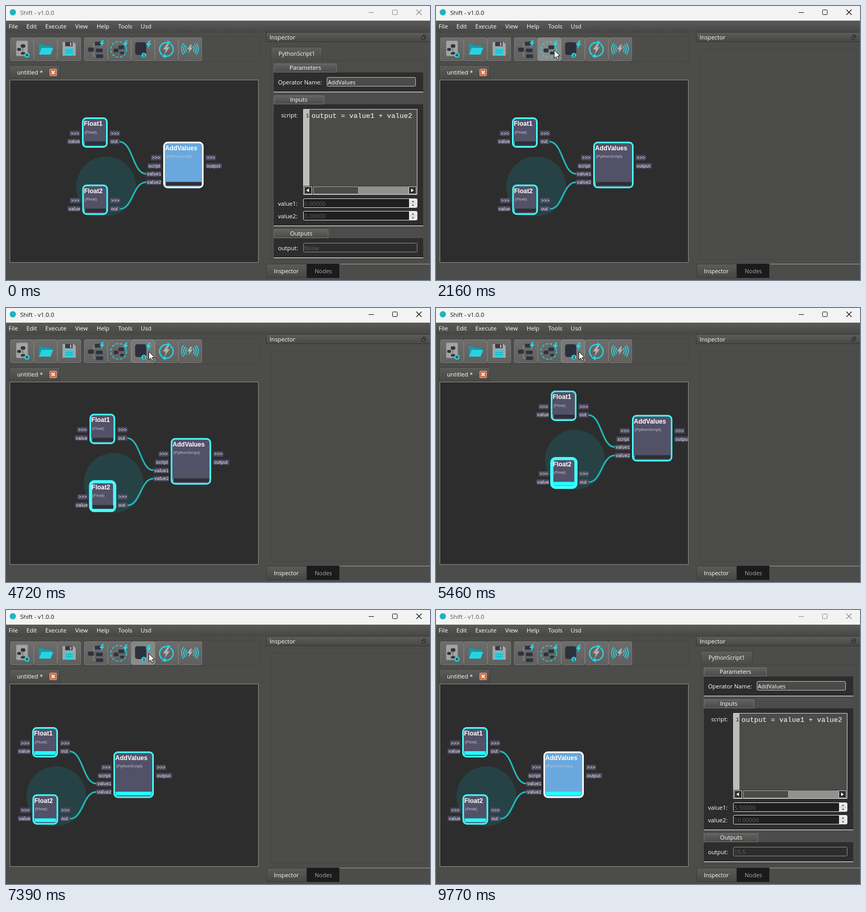
An HTML page with a canvas that plays this animation: 809 px wide and 524 px high, repeating every 9.82 s.

```html
<!DOCTYPE html>
<html lang="en">
<head>
<meta charset="utf-8">
<title>Shift - v1.0.0</title>
<style>
html, body { margin: 0; width: 100%; height: 100%; overflow: hidden; background: #4c4c4a; }
canvas { display: block; }
</style>
</head>
<body>
<canvas width="809" height="524"></canvas>
<script>
const g = document.querySelector('canvas').getContext('2d');
const LOOP = 9820, CYAN = '#4ff', ICON = '#27d3e3', DARK = '#2d2d2d';
const UI = '"Open Sans", "Noto Sans", sans-serif';
const SANS = '"Liberation Sans", Arial, sans-serif';
const MONO = '"Liberation Mono", monospace';

// time, x, y
const cursorPath = [
  [340, 395, 475], [600, 371, 183], [1060, 371, 183], [1200, 222, 128], [1270, 214, 120],
  [1480, 182, 88], [1760, 225, 84], [2160, 225, 84], [2440, 272, 83], [7680, 272, 83],
  [8340, 250, 318], [8710, 250, 318], [9020, 349, 381]
];
// time, x, y
const panPath = [
  [0, 0, 0], [4690, 0, 0], [4850, 74, -55], [6090, 74, -55], [6250, 75, 72.5],
  [7230, 75, 72.5], [7380, -95, 11], [LOOP, -95, 11]
];
const buttonX = [8, 53, 98, 149, 194, 239, 284, 329];

function along(path, t) {
  let i = 1;
  while (i < path.length - 1 && path[i][0] < t) i++;
  const [t0, x0, y0] = path[i - 1], [t1, x1, y1] = path[i];
  const k = Math.min(1, Math.max(0, (t - t0) / (t1 - t0)));
  return [x0 + (x1 - x0) * k, y0 + (y1 - y0) * k];
}
const within = (t, a, b) => t >= a && t < b;

function shade(y, h, a, b) {
  const s = g.createLinearGradient(0, y, 0, y + h);
  s.addColorStop(0, a);
  s.addColorStop(1, b);
  return s;
}
function rect(x, y, w, h, fill) {
  g.fillStyle = fill;
  g.fillRect(x, y, w, h);
}
function box(x, y, w, h, fill, line, r = 0, lw = 1) {
  g.beginPath();
  g.roundRect(x + lw / 2, y + lw / 2, w - lw, h - lw, r);
  if (fill) { g.fillStyle = fill; g.fill(); }
  if (line) { g.strokeStyle = line; g.lineWidth = lw; g.stroke(); }
}
function text(s, x, y, size = 11.2, color = '#fff', font = UI, weight = '') {
  g.font = `${weight} ${size}px ${font}`;
  g.fillStyle = color;
  g.fillText(s, x, y);
}
function trace(points) {
  g.beginPath();
  for (let i = 0; i < points.length; i += 2) g.lineTo(points[i], points[i + 1]);
}
function poly(points, fill) {
  trace(points);
  g.closePath();
  g.fillStyle = fill;
  g.fill();
}
function line(points, color, lw = 1) {
  trace(points);
  g.strokeStyle = color;
  g.lineWidth = lw;
  g.stroke();
}
function disc(x, y, r, fill) {
  g.beginPath();
  g.arc(x, y, r, 0, 7);
  g.fillStyle = fill;
  g.fill();
}
function arc(x, y, r, a, b, color, lw = 2) {
  g.beginPath();
  g.arc(x, y, r, a, b);
  g.strokeStyle = color;
  g.lineWidth = lw;
  g.stroke();
}
function at(x, y, draw) {
  g.save();
  g.translate(x, y);
  draw();
  g.restore();
}
function bolt(x, y, k, fill) {
  at(x, y, () => {
    g.scale(k, k);
    poly([1, -9, -6, 1, -1, 1, -3, 9, 6, -3, 1, -3, 5, -9], fill);
  });
}
const block = (x, y, w, h) => box(x, y, w, h, '#2d323e', '#4a4e58', 2);

// Toolbar icons, drawn in a 45 x 45 cell
const icons = [
  () => {
    box(11, 6, 23, 30, '#a3a3a1', '#888', 2);
    block(20, 13, 9, 7); block(13, 20, 8, 6); block(20, 28, 9, 5);
    line([24, 20, 24, 28], '#555');
    disc(32, 34, 5, ICON);
    line([29, 34, 35, 34], '#333', 1.5); line([32, 31, 32, 37], '#333', 1.5);
  },
  () => {
    poly([10, 13, 18, 13, 21, 16, 33, 16, 33, 32, 10, 32], '#159aa9');
    poly([15, 20, 37, 20, 32, 33, 10, 33], ICON);
  },
  () => {
    poly([10, 9, 31, 9, 35, 13, 35, 35, 10, 35], '#a6a6a4');
    rect(15, 9, 14, 8, '#353b46'); rect(24, 10, 3, 6, '#a6a6a4');
    rect(14, 21, 17, 13, ICON);
    line([16, 25, 29, 25], '#1a9aa8'); line([16, 29, 29, 29], '#1a9aa8');
  },
  () => {
    line([13, 23, 18, 23, 18, 12, 24, 12], '#999'); line([18, 23, 18, 36, 24, 36], '#999');
    block(7, 19, 12, 9); block(20, 8, 13, 8); block(22, 21, 14, 8); block(22, 32, 15, 8);
    bolt(34, 12, .8, ICON);
  },
  () => {
    g.setLineDash([5, 3]);
    arc(21, 23, 15, 0, 6.28, ICON, 1.7);
    g.setLineDash([]);
    block(11, 21, 10, 8); block(20, 15, 12, 8); block(23, 27, 9, 6);
    bolt(34, 13, .8, ICON);
  },
  () => {
    box(7, 9, 22, 25, '#2b303c', '#41454f', 4);
    bolt(33, 14, .85, ICON);
    disc(24, 34, 4.5, ICON);
    text('1', 22, 37, 8, '#222', SANS, 'bold');
  },
  () => {
    arc(22, 23, 13, 2.2, 4.9, ICON, 2.5); arc(22, 23, 13, -.9, 1.8, ICON, 2.5);
    poly([24, 6, 31, 10, 24, 14], ICON); poly([21, 40, 13, 36, 20, 31], ICON);
    bolt(22, 22, 1.05, '#b3b3b1');
  },
  () => {
    for (const r of [8, 12, 16]) {
      arc(22, 22, r, -.75, .75, ICON, 1.8);
      arc(22, 22, r, 2.39, 3.89, ICON, 1.8);
    }
    bolt(22, 22, .9, '#b3b3b1');
  }
];

function frame(active, hover, pressed, soft) {
  rect(0, 0, 809, 524, '#4c4c4a');
  rect(0, 0, 809, 28, '#f3f3f3');
  disc(13, 12, 6, '#1fb3c2');
  text('Shift - v1.0.0', 27, 17, 11.4, active ? '#111' : '#555');
  const ink = active ? '#111' : '#8a8a8a';
  line([692, 12.5, 702, 12.5], ink);
  box(737, 7, 10, 10, null, ink, 1);
  line([783, 7, 793, 17], ink, 1.2);
  line([793, 7, 783, 17], ink, 1.2);

  rect(0, 28, 809, 23, shade(28, 23, '#5a5a58', '#464644'));
  const menu = { File: 5, Edit: 39, Execute: 75, View: 132, Help: 173, Tools: 214, Usd: 257 };
  for (const m in menu) text(m, menu[m], 43);

  box(7, 58, 476, 49, null, '#444442');
  buttonX.forEach((x, i) => {
    const over = i === hover;
    const fill = !over ? shade(60, 45, '#6d6d6b', '#60605e')
      : soft ? shade(60, 45, '#797977', '#737371') : shade(60, 45, '#858583', '#8d8d8b');
    box(x, 60, 45, 45, fill, over ? '#8a8a88' : '#787876', 2);
    const d = over && pressed ? 1 : 0;
    at(x + d, 60 + d, icons[i]);
  });

  box(6, 113, 97, 29, shade(113, 28, '#5c5c5a', '#474745'), '#3b3b39', 2);
  text('untitled *', 21, 131);
  box(83, 120, 14, 14, '#c96f45', '#eba37e', 1);
  line([87, 124, 93, 130], '#fff', 1.8);
  line([93, 124, 87, 130], '#fff', 1.8);

  rect(496, 50, 313, 18, shade(50, 18, '#5d5d5b', '#484846'));
  line([496.5, 50, 496.5, 68.5, 809, 68.5], '#333');
  line([496, 50.5, 809, 50.5], '#3a3a38');
  text('Inspector', 503, 64);
  box(795, 55, 6, 6, null, '#222');
  box(793, 58, 6, 6, '#555', '#222');

  rect(636, 493, 173, 1, '#a0a09e');
  box(497, 493, 77, 27, shade(493, 27, '#5c5c5a', '#464644'), '#3b3b39');
  text('Inspector', 511, 511, 10.8);
  rect(574, 493, 62, 27, '#1b1b1b');
  text('Nodes', 589, 511, 11, '#aaa');
}

function group(name, x, y, w, h, headW) {
  box(511, y, headW, 17, shade(y, 17, '#626260', '#4a4a48'), '#757573');
  text(name, x, y + 12);
  rect(511, y + 17, 285, h, DARK);
  rect(511, y + 17 + h, 285, 1, '#fff');
}
function spinner(name, y, value) {
  text(name, 519, y + 14);
  box(567, y, 218, 18, '#1e1e1e', '#e0e0e0', 2);
  text(value, 569, y + 14, 11, '#636363');
  rect(769, y + 1, 15, 16, '#ececec');
  rect(769, y + 9, 15, 1, '#c4c4c4');
  poly([774, y + 7, 779, y + 7, 776.5, y + 4], '#555');
  poly([774, y + 12, 779, y + 12, 776.5, y + 15], '#555');
}
function inspector(v1, v2, out) {
  box(505, 78, 99, 27, shade(78, 26, '#5e5e5c', '#4a4a48'), '#3d3d3b', 2);
  box(505, 104, 298, 382, null, '#444442');
  text('PythonScript1', 520, 95, 10.7);

  group('Parameters', 541, 110, 0, 37, 120);
  text('Operator Name:', 519, 150, 11);
  box(612, 136, 170, 18, '#4b4b49', '#c4c4c4', 2);
  text('AddValues', 614, 150, 10.8);

  group('Inputs', 542, 171, 0, 232, 96);
  text('script:', 525, 213);
  box(567, 197, 218, 164, '#4b4b49', '#d8d8d8');
  rect(568, 198, 11, 146, '#bcbcba');
  text('1', 572, 213, 11, '#222', MONO);
  text('output = value1 + value2', 583, 214, 13.33, '#fff', MONO);
  rect(568, 344, 216, 16, '#343432');
  for (const [x, d] of [[569, -1], [768, 1]]) {
    box(x, 345, 15, 15, DARK, '#ddd');
    poly([x + 7 - d * 2, 349, x + 7 - d * 2, 356, x + 7 + d * 3, 352.5], '#fff');
  }
  box(586, 345, 87, 15, '#4b4b49', '#b0b0ae');
  rect(673, 345, 95, 15, '#343432');
  g.fillStyle = '#eee';
  for (let y = 345; y < 360; y++)
    for (let x = 673 + y % 2; x < 768; x += 2) g.fillRect(x, y, 1, 1);
  spinner('value1:', 368, v1);
  spinner('value2:', 392, v2);

  group('Outputs', 542, 427, 0, 37, 104);
  text('output:', 519, 467);
  box(567, 453, 218, 18, DARK, '#8f8f8d', 2);
  text(out, 569, 467, 11, '#636363');
}

function pill(s, x, y, w) {
  box(x, y, w, 11, '#4b4a60', null, 2);
  g.letterSpacing = '.25px';
  text(s, x + 2.5, y + 8.5, 8.8, '#f0f0f6', SANS);
  g.letterSpacing = '0px';
}
function node(n, s) {
  const { x, y, w, h } = n, grow = s.busy ? 1.5 : 0;
  const fill = s.selected ? (s.hover ? '#75b1e4' : '#69a8de') : s.hover ? '#5d5c75' : '#525168';
  box(x - grow, y - grow, w + 2 * grow, h + 2 * grow, fill, s.selected ? '#fff' : CYAN, 7, s.busy ? 6 : 3);
  text(n.name, x + 3.5, y + 16, 12, '#fff', SANS, 'bold');
  text(n.type, x + 5, y + 30.5, 8, '#c3c3d0', SANS);
  rect(x + 4, y + h - 12, w - 8, 7, s.done ? '#2ff' : '#2e2e34');
  if (!s.done) rect(x + 4, y + h - 12, 1, 7, CYAN);
  n.ins.forEach(([p, pw], i) => pill(p, x - 3.5 - pw, y + 25 + i * 15.7, pw));
  n.outs.forEach(([p, pw], i) => pill(p, x + w + 3.5, y + 25 + i * 15.7, pw));
}
const exec = ['>>>', 20.5];
const float = (name, x, y) => ({
  name, type: '(Float)', x, y, w: 49, h: 58, ins: [exec, ['value', 25]], outs: [exec, ['out', 20]]
});
const float1 = float('Float1', 145, 213), float2 = float('Float2', 145.5, 341.5);
const add = {
  name: 'AddValues', type: '(PythonScript)', x: 300, y: 259.5, w: 77, h: 89,
  ins: [exec, ['script', 27], ['value1', 30], ['value2', 30]], outs: [exec, ['output', 32]]
};

function wire(y0, y1) {
  g.beginPath();
  g.moveTo(217, y0);
  g.bezierCurveTo(242, y0 + 1, 242, y1, 267, y1);
  g.strokeStyle = '#1fb9ba';
  g.lineWidth = 3;
  g.stroke();
}
function graph(t, mouse, selected) {
  const [px, py] = along(panPath, t);
  box(7, 141, 475, 350, DARK, '#8f8f8d');
  g.save();
  g.beginPath();
  g.rect(8, 142, 473, 348);
  g.clip();
  g.translate(px, py);
  disc(191, 345, 57, '#264245');
  wire(259.5, 321);
  wire(388, 337);
  const mx = mouse[0] - px - add.x, my = mouse[1] - py - add.y;
  node(float1, { busy: within(t, 6120, 7260), done: t >= 6320 });
  node(float2, { busy: within(t, 4720, 6120), done: t >= 4920 });
  node(add, {
    busy: within(t, 7260, 7390), done: t >= 7390, selected,
    hover: mx > 0 && my > 0 && mx < add.w && my < add.h
  });
  g.restore();
}

function pointer(x, y) {
  at(x, y, () => {
    trace([.5, .5, .5, 16, 4.2, 12.6, 7, 18.5, 9.3, 17.4, 6.7, 11.7, 11.5, 11.5]);
    g.closePath();
    g.fillStyle = '#fff';
    g.fill();
    g.strokeStyle = '#111';
    g.lineWidth = 1;
    g.stroke();
  });
}

function draw(t) {
  const shown = within(t, 340, 9020);
  const mouse = shown ? along(cursorPath, t) : [-99, -99];
  const hover = within(mouse[1], 60, 105) ? buttonX.findIndex(x => within(mouse[0], x, x + 45)) : -1;
  const pressed = within(t, 4100, 4240) || within(t, 5320, 5460) || within(t, 6650, 6780);
  const selected = t < 800 || t >= 8480;

  frame(within(t, 800, 9770), hover, pressed, within(t, 4100, 7260));
  if (!selected) box(505, 82, 298, 403, null, '#444442');
  else if (t < 800) inspector('0.00000', '0.00000', 'None');
  else inspector('5.50000', '10.00000', '15.5');
  graph(t, mouse, selected);

  if (within(t, 3170, 4100)) {
    g.globalAlpha = t < 3240 ? .6 : 1;
    rect(276, 101, 128, 19, 'rgba(0,0,0,.35)');
    box(274, 99, 129, 19, '#fff', '#888');
    text('Execute next operator', 280, 113, 11.2, '#555');
    g.globalAlpha = 1;
  }
  if (shown) pointer(...mouse);
}

const start = performance.now();
function tick() {
  draw((performance.now() - start) % LOOP);
  requestAnimationFrame(tick);
}
tick();
</script>
</body>
</html>
```
